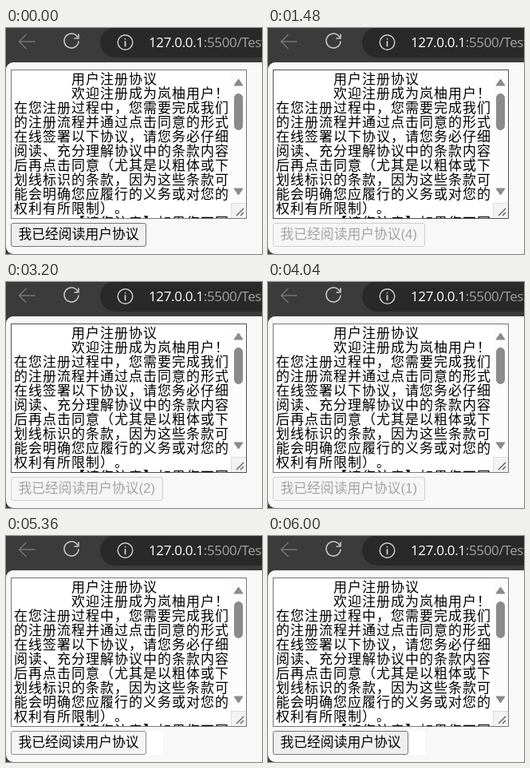
These frames come from a looping animation (321 by 283 pixels, 6.32 s). An HTML page:

```html
<!DOCTYPE html>
<html lang="zh-CN">
<head>
<meta charset="utf-8">
<title>用户注册协议</title>
<style>
  html, body { margin: 0; width: 100%; height: 100%; overflow: hidden; background: #3b3b3b; }
  #stage { position: relative; width: 321px; height: 283px; overflow: hidden; background: #3b3b3b; }
  #stage div, #stage svg { position: absolute; box-sizing: border-box; }
  #address { left: 118px; top: -1px; width: 230px; height: 38px; border-radius: 19px; background: #292929; }
  #url { left: 179px; top: 0; line-height: 36px; white-space: pre; color: #a3a3a3;
    font-family: "Open Sans", "Noto Sans", sans-serif; font-size: 17px; letter-spacing: -.35px; }
  #url b { font-weight: 400; color: #fff; }
  #page { left: 0; top: 43px; width: 340px; height: 240px; border-radius: 9px; background: #f8f8f8; }
  #box { left: 6px; top: 52px; width: 296px; height: 187px; overflow: hidden;
    background: #fff; border: 1px solid #767676; }
  #terms { left: 3px; top: 1px; white-space: pre; color: #000; text-spacing-trim: space-all;
    font: 300 17px/18px "Noto Sans CJK SC", sans-serif; letter-spacing: 1px; }
  #patch { left: 176px; top: 244px; width: 21px; height: 30px; background: #fff; }
  #button { left: 6px; top: 244px; height: 30px; padding-left: 8.5px; border: 1px solid; border-radius: 3px;
    white-space: pre; font: 16.8px/28px "Liberation Sans", "Noto Sans CJK SC", sans-serif; }
</style>
</head>
<body>
<div id="stage">
  <div id="address"></div>
  <svg width="321" height="43" fill="none" stroke-linecap="round" stroke-linejoin="round">
    <rect id="reloadGlow" x="57" y="3" width="50" height="34" rx="5" fill="#484848"/>
    <path d="M36 17H17M25 8.5L16.5 17L25 25.5" stroke="#767676" stroke-width="1.5"/>
    <path id="reload" d="M89.5 11A9 9 0 1 0 91 17M91 8V13H86" stroke-width="1.6"/>
    <g id="info" stroke-width="1.5">
      <circle cx="149.5" cy="18" r="9.3"/>
      <path d="M149.5 17V22.5M149.5 13.6V13.7" stroke-width="1.8"/>
    </g>
  </svg>
  <div id="url"><b>127.0.0.1</b>:5500/Test</div>
  <div id="page"></div>
  <div id="box">
    <div id="terms"></div>
    <svg style="left:275px;top:0" width="19" height="185">
      <path d="M0 0H19V185H0z" fill="#fcfcfc"/>
      <path d="M0 166H19V185H0z" fill="#f3f3f3"/>
      <path d="M0 166.5H19M.5 166V185" stroke="#dcdcdc"/>
      <g fill="#8b8b8b" stroke="#8b8b8b" stroke-linejoin="round">
        <path d="M9.5 11L15 19H4z"/>
        <path d="M9.5 156L15 148H4z"/>
        <rect x="4.5" y="29.5" width="10" height="45" rx="5"/>
      </g>
      <path d="M7 182L16 173M12 182L16 178" stroke="#555" stroke-width="1.2"/>
    </svg>
  </div>
  <div id="patch"></div>
  <div id="button"></div>
</div>
<script>
const LOOP = 6320;
const LABEL = '我已经阅读用户协议';
const INDENT = '\u3000'.repeat(4);
const $ = id => document.getElementById(id);

$('terms').textContent = [
  INDENT + '用户注册协议',
  INDENT + '欢迎注册成为岚柚用户！',
  '在您注册过程中，您需要完成我们',
  '的注册流程并通过点击同意的形式',
  '在线签署以下协议，请您务必仔细',
  '阅读、充分理解协议中的条款内容',
  '后再点击同意（尤其是以粗体或下',
  '划线标识的条款，因为这些条款可',
  '能会明确您应履行的义务或对您的',
  '权利有所限制）。',
  INDENT + '【请您注意】如果您不同'
].join('\n');

// background, border, text
const LOOKS = {
  normal: ['#efefef', '#767676', '#000'],
  hover: ['#e5e5e5', '#4f4f4f', '#000'],
  press: ['#f5f5f5', '#8d8d8d', '#000'],
  disabled: ['#f6f6f6', '#cfcfcf', '#a3a3a3']
};

// start time, look, countdown
const STEPS = [
  [0, 'normal'],
  [640, 'disabled', 5], [1480, 'disabled', 4], [2360, 'disabled', 3],
  [3200, 'disabled', 2], [4040, 'disabled', 1],
  [4920, 'normal'], [5080, 'hover'], [5360, 'press'], [5440, 'hover'], [5680, 'normal']
];

// stepped fade from 0 to 1
function ramp(t, from, to) {
  const tick = Math.floor(t / 40) * 40;
  return Math.max(0, Math.min(1, (tick - from + 40) / (to - from + 40)));
}

function gray(a, b, k) {
  const v = Math.round(a + (b - a) * k);
  return `rgb(${v},${v},${v})`;
}

function draw(t) {
  const infoHover = ramp(t, 120, 200) - ramp(t, 360, 480);
  const reloadHover = ramp(t, 360, 480) - ramp(t, 1080, 1240);
  $('info').style.stroke = gray(205, 255, infoHover);
  $('reload').style.stroke = gray(200, 255, reloadHover);
  $('reloadGlow').style.opacity = reloadHover;

  const overBox = (t >= 1240 && t < 3400) || (t >= 5760 && t < 6000);
  $('box').style.borderColor = overBox ? '#4f4f4f' : '#767676';

  const [, look, count] = STEPS.findLast(step => step[0] <= t);
  const [fill, line, ink] = LOOKS[look];
  const button = $('button');
  button.textContent = count ? `${LABEL}(${count})` : LABEL;
  button.style.width = count ? '191px' : '170px';
  button.style.background = fill;
  button.style.borderColor = line;
  button.style.color = ink;
  $('patch').style.visibility = t >= 4920 ? 'visible' : 'hidden';
}

function tick() {
  draw(performance.now() % LOOP);
  requestAnimationFrame(tick);
}
tick();
</script>
</body>
</html>
```
